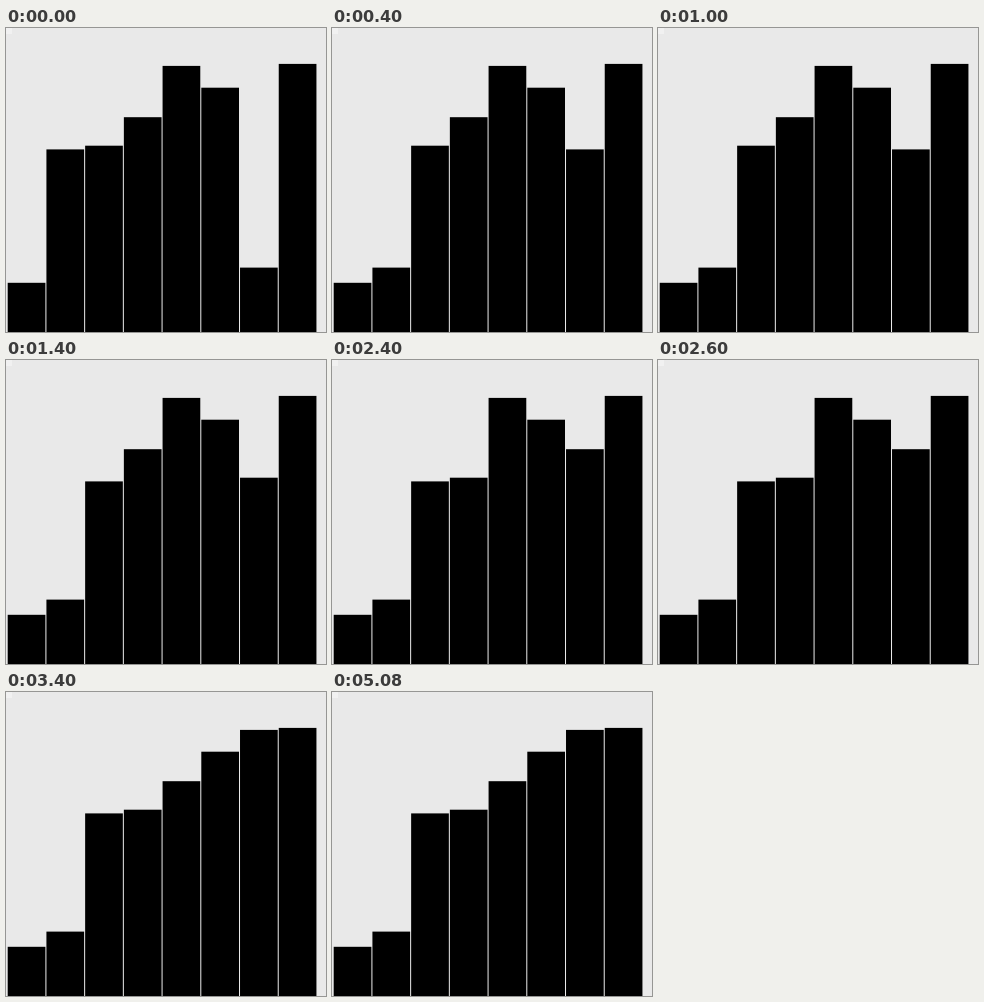
Write an HTML page with a canvas that moves like this. It is 320 px wide and 304 px high and loops after 6.2 s.

```html
<!DOCTYPE html>
<html lang="en">
<head>
<meta charset="utf-8">
<title>Sorting bars</title>
<style>
  html, body { margin: 0; width: 100%; height: 100%; overflow: hidden; background: #e9e9e9; }
  canvas { display: block; }
</style>
</head>
<body>
<canvas id="stage" width="320" height="304"></canvas>
<script>
const W = 320, H = 304, LOOP = 6200;
const LEFT = 1.7, PITCH = 38.72, BAR = 37.7;
const FIRST_SWAP = 400, STEP = 1000, SWAPS = 4, PARTNER = 6;
const START = [254.8, 121.4, 117.7, 89.2, 37.9, 59.7, 239.6, 35.9];
const ctx = document.getElementById('stage').getContext('2d');

// Once per step, the next bar trades places with the partner.
function topsAt(time) {
  const tops = START.slice();
  const done = Math.min(SWAPS, Math.floor((time - FIRST_SWAP) / STEP) + 1);
  for (let i = 1; i <= done; i++) {
    [tops[i], tops[PARTNER]] = [tops[PARTNER], tops[i]];
  }
  return tops;
}

function draw(time) {
  ctx.fillStyle = '#e9e9e9';
  ctx.fillRect(0, 0, W, H);
  ctx.fillStyle = '#f1f1f1';
  ctx.fillRect(0, 0, 6, 6);
  ctx.fillStyle = '#000';
  topsAt(time).forEach((top, i) => ctx.fillRect(LEFT + i * PITCH, top, BAR, H - top));
}

const begin = performance.now();
function tick() {
  draw((performance.now() - begin) % LOOP);
  requestAnimationFrame(tick);
}
tick();
</script>
</body>
</html>
```
